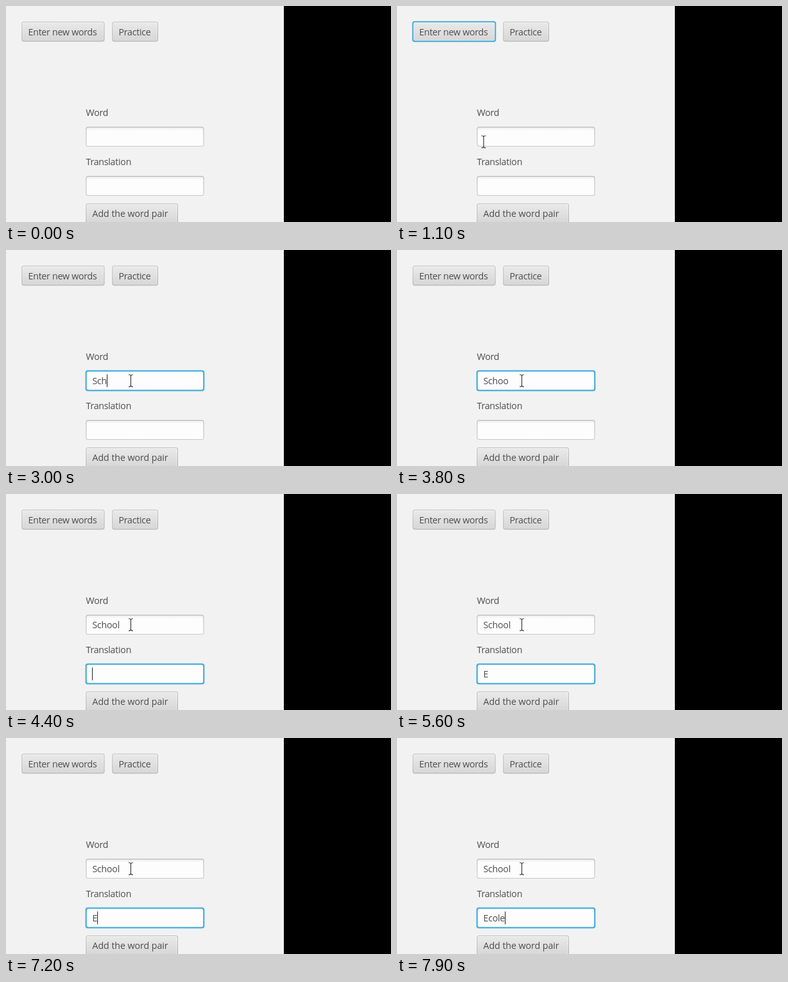
Write an HTML page with a canvas that moves like this. It is 600 px wide and 338 px high and loops after 8000 ms.

```html
<!DOCTYPE html>
<html lang="en">
<head>
<meta charset="utf-8">
<title>Word pairs</title>
<style>
html, body { margin: 0; width: 100%; height: 100%; overflow: hidden; background: #000; }
canvas { display: block; width: 600px; height: 338px; }
</style>
</head>
<body>
<canvas id="stage" width="600" height="338"></canvas>
<script>
const ctx = document.getElementById('stage').getContext('2d');
const LOOP = 8000;
const INK = '#4e4e4e';

// [start time, value] steps; the last step reached is in force
const word = [[0, ''], [2400, 'S'], [2600, 'Sc'], [2900, 'Sch'], [3200, 'Scho'], [3300, 'Schoo'], [4100, 'School']];
const translation = [[0, ''], [5100, 'E'], [7400, 'Ec'], [7500, 'Eco'], [7700, 'Ecol'], [7800, 'Ecole']];
const focus = [[0, ''], [800, 'button'], [1700, 'word'], [4400, 'translation']];
const caret = [[0, true], [3800, false], [4100, true], [5500, false], [6000, true], [6500, false], [6900, true]];
const pointer = [[0, null], [800, [135, 212.5]], [1700, [194.5, 204.5]]];

function at(steps, t) {
  let value;
  for (const [start, v] of steps) if (t >= start) value = v;
  return value;
}

function box(x, y, w, h, r, fill) {
  ctx.beginPath();
  ctx.roundRect(x, y, w, h, r);
  ctx.fillStyle = fill;
  ctx.fill();
}

function shade(y, h, ...stops) {
  const g = ctx.createLinearGradient(0, y, 0, y + h);
  for (const [pos, color] of stops) g.addColorStop(pos, color);
  return g;
}

function text(s, x, y, spacing = -0.3) {
  ctx.font = '14.3px "Open Sans", "Noto Sans", sans-serif';
  ctx.letterSpacing = spacing + 'px';
  ctx.fillStyle = INK;
  ctx.fillText(s, x, y);
  return ctx.measureText(s).width;
}

function ring(x, y, w, h) {
  box(x - 1.5, y - 1.5, w + 3, h + 3, 4.5, '#b9dfef');
  box(x - 0.5, y - 0.5, w + 1, h + 1, 3.5, '#35a5d6');
}

function button(label, x, y, w, focused, spacing) {
  const h = 31;
  if (focused) {
    ring(x, y, w, h);
  } else {
    box(x, y + 1, w, h, 3.5, '#e9e9e9');
    box(x, y, w, h, 3.5, shade(y, h, [0, '#bdbdbd'], [1, '#aaaaaa']));
  }
  box(x + 1, y + 1, w - 2, h - 2, 2.5, shade(y, h, [0, '#f7f7f7'], [1, '#dedede']));
  box(x + 2, y + 2, w - 4, h - 4, 2, shade(y, h, [0, '#eaeaea'], [1, '#d6d6d6']));
  text(label, x + 10, y + 21, spacing);
}

function field(value, y, focused, showCaret) {
  const x = 124.5, w = 184, h = 31;
  if (focused) {
    ring(x, y, w, h);
    box(x + 1.2, y + 1.2, w - 2.4, h - 2.4, 2.5, '#fdfdfd');
  } else {
    box(x, y, w, h, 3.5, shade(y, h, [0, '#b2b2b2'], [1, '#c6c6c6']));
    box(x + 1, y + 1, w - 2, h - 2, 2.5, shade(y, h, [0, '#e6e6e6'], [0.18, '#fdfdfd'], [1, '#fdfdfd']));
  }
  const width = text(value, 134.5, y + 21);
  if (focused && showCaret) {
    ctx.fillStyle = '#3c3c3c';
    ctx.fillRect(Math.round(134 + width), y + 5.5, 1.2, 20);
  }
}

function beam(x, y) {
  const path = new Path2D();
  for (const d of [-1, 1]) {
    path.moveTo(x - 3.5, y + d * 9.5);
    path.quadraticCurveTo(x - 0.5, y + d * 9.5, x, y + d * 8);
    path.quadraticCurveTo(x + 0.5, y + d * 9.5, x + 3.5, y + d * 9.5);
  }
  path.moveTo(x, y - 8);
  path.lineTo(x, y + 8);
  ctx.lineWidth = 1.2;
  ctx.strokeStyle = '#3a3a3a';
  ctx.stroke(path);
}

function draw(t) {
  const active = at(focus, t);
  const showCaret = at(caret, t);
  const mouse = at(pointer, t);

  ctx.fillStyle = '#000';
  ctx.fillRect(0, 0, 600, 338);
  ctx.fillStyle = '#f3f2f3';
  ctx.fillRect(0, 0, 433, 338);

  button('Enter new words', 24.5, 24.5, 129, active === 'button');
  button('Practice', 165.5, 24.5, 71.5);
  text('Word', 124.5, 172);
  field(at(word, t), 189, active === 'word', showCaret);
  text('Translation', 124.5, 248.5);
  field(at(translation, t), 266, active === 'translation', showCaret);
  button('Add the word pair', 124.5, 309, 143.5, false, -0.1);

  if (mouse) beam(...mouse);
}

const begin = performance.now();
function tick() {
  draw((performance.now() - begin) % LOOP);
  requestAnimationFrame(tick);
}
tick();
</script>
</body>
</html>
```
